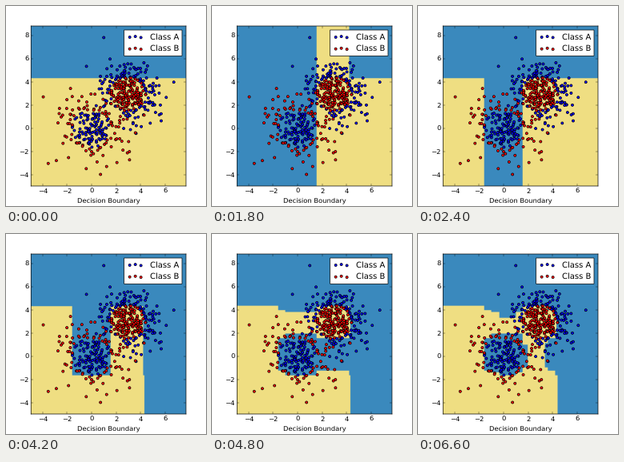
Recreate the animation shown at these times as a matplotlib script. Size 250x250 px, loop 7200 ms.

```python
import numpy as np
import matplotlib.pyplot as plt
from matplotlib.animation import FuncAnimation

plt.style.use("classic")
plt.rcParams.update({
    "font.family": "DejaVu Sans",
    "figure.facecolor": "white",
    "savefig.facecolor": "white",
    "savefig.dpi": "figure",
    "path.snap": False,
    "text.hinting": "no_hinting",
})

# The ensemble grows by half at every step: 1, 2, 3, 4, 6, 8, 12, ...
SIZES = np.ceil(1.5 ** np.arange(12)).astype(int)
STEP = 0.02
BLUE = (58, 137, 189)
YELLOW = (239, 222, 130)


def gaussian_quantiles(mean, cov, n):
    """Two classes split by distance from the centre of one Gaussian."""
    rng = np.random.RandomState(1)
    pts = mean + np.sqrt(cov) * rng.standard_normal((n, 2))
    pts = pts[np.argsort(((pts - mean) ** 2).sum(axis=1))]
    labels = np.repeat([0, 1], n // 2)
    order = np.arange(n)
    rng.shuffle(order)
    return pts[order], labels[order]


def fit_stump(X, y, w):
    """Best weighted Gini split: axis, threshold, left and right class."""
    best = None
    for axis in (0, 1):
        order = np.argsort(X[:, axis])
        v, ws, ys = X[order, axis], w[order], y[order]
        a = np.cumsum(ws * (ys == 0))
        b = np.cumsum(ws * (ys == 1))
        la, lb = a[:-1], b[:-1]
        ra, rb = a[-1] - la, b[-1] - lb
        cost = la * lb / (la + lb) + ra * rb / (ra + rb)
        i = np.argmin(cost)
        if best is None or cost[i] < best[0]:
            best = (cost[i], axis, (v[i] + v[i + 1]) / 2,
                    int(lb[i] > la[i]), int(rb[i] > ra[i]))
    return best[1:]


def boost(X, y, rounds):
    """Discrete AdaBoost (SAMME) on decision stumps."""
    w = np.full(len(y), 1 / len(y))
    for _ in range(rounds):
        axis, cut, left, right = fit_stump(X, y, w)
        wrong = np.where(X[:, axis] <= cut, left, right) != y
        err = w[wrong].sum()
        alpha = np.log((1 - err) / err)
        w = w * np.exp(alpha * wrong)
        w /= w.sum()
        yield axis, cut, left, right, alpha


X1, y1 = gaussian_quantiles(np.array([0, 0]), 2.0, 200)
X2, y2 = gaussian_quantiles(np.array([3, 3]), 1.5, 300)
X = np.concatenate([X1, X2])
y = np.concatenate([y1, 1 - y2])

xs, ys = (np.arange(c.min() - 1, c.max() + 1, STEP) for c in X.T)
grid = (xs[None, :], ys[:, None])
score = np.zeros((len(ys), len(xs)))
regions = {}
for n, (axis, cut, left, right, alpha) in enumerate(boost(X, y, SIZES[-1]), 1):
    vote = np.where(grid[axis] <= cut, left, right)
    score += alpha * (2 * vote - 1)
    if n in SIZES:
        regions[n] = score > 0


def paint(n):
    return np.where(regions[n][..., None], YELLOW, BLUE).astype(np.uint8)


fig = plt.figure(figsize=(5, 5), dpi=50)
ax = fig.add_axes([0.125, 0.1, 0.775, 0.8])
image = ax.imshow(paint(SIZES[0]), origin="lower", aspect="auto",
                  extent=(xs[0], xs[-1], ys[0], ys[-1]),
                  interpolation="antialiased", resample=True, zorder=0)

for label, name, color in ((0, "Class A", "b"), (1, "Class B", "r")):
    pts = X[y == label]
    # One colour per point keeps markers at sub-pixel positions.
    ax.scatter(pts[:, 0], pts[:, 1], s=20, c=[color] * len(pts),
               edgecolors="k", linewidths=1, label=name)

ax.set_xlim(xs[0], xs[-1])
ax.set_ylim(ys[0], ys[-1])
ax.set_xticks(range(-4, 7, 2))
ax.set_yticks(range(-4, 9, 2))
ax.set_xlabel("Decision Boundary")
ax.legend(loc="upper right")


def update(i):
    image.set_data(paint(SIZES[i]))
    return [image]


anim = FuncAnimation(fig, update, frames=len(SIZES), interval=600,
                     repeat=True, repeat_delay=0, blit=False)
plt.show()
```
